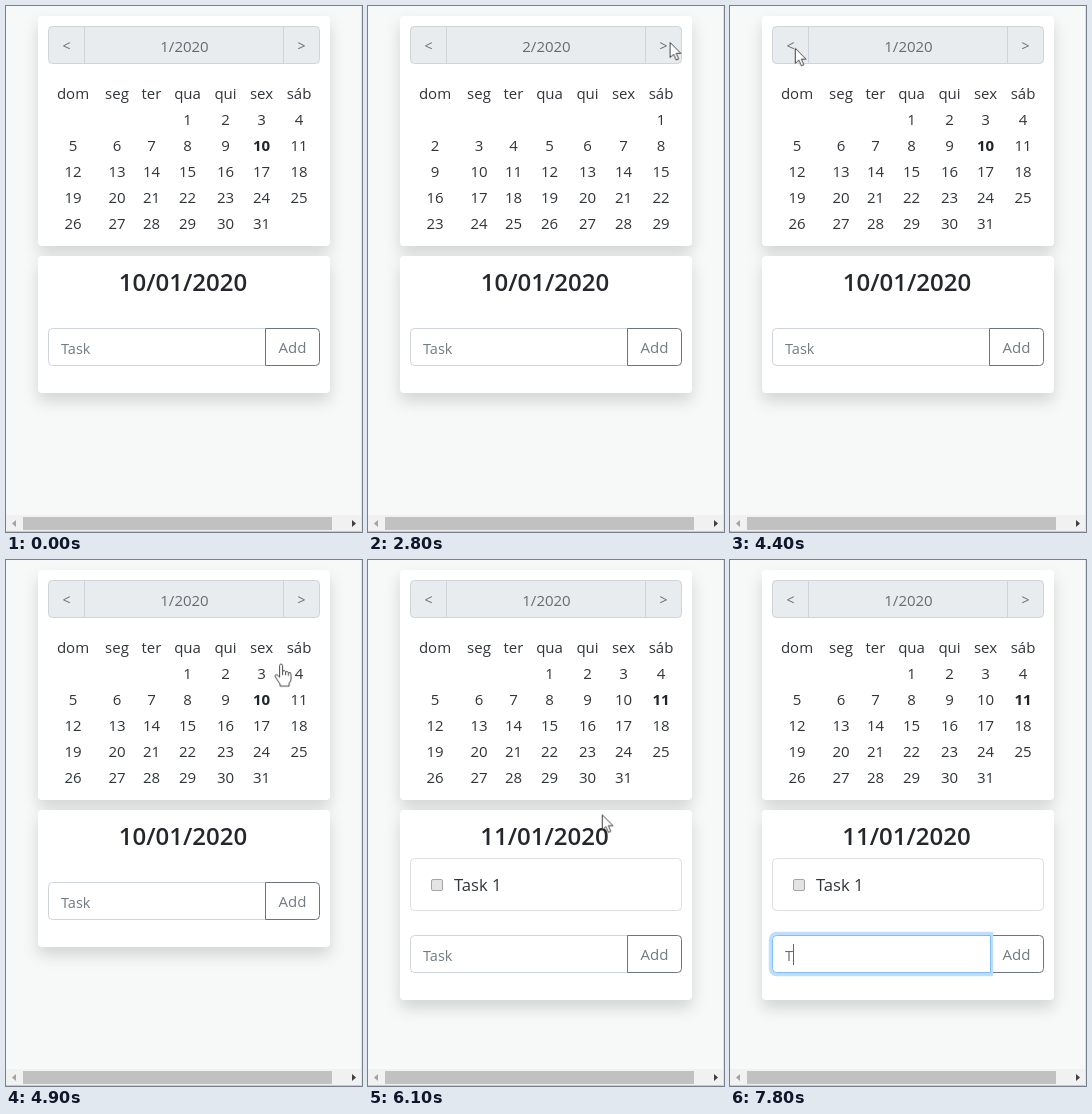
Animation of 356x526 px, one loop 8 s. Source, as an HTML page:

```html
<!DOCTYPE html>
<html lang="pt">
<head>
<meta charset="utf-8">
<title>Calendar tasks</title>
<style>
html, body { margin: 0; width: 100%; height: 100%; overflow: hidden; background: #f7f9f9; }
.stage { position: relative; width: 356px; height: 526px; overflow: hidden; }
.card {
  position: absolute; left: 32px; width: 292px; border-radius: 4px;
  background: #fff; box-shadow: 0 8px 16px rgba(0, 0, 0, .15);
}
.calendar { top: 10px; height: 230px; }
.tasks { top: 250px; height: 137px; }
svg { position: absolute; left: 0; top: 0; }
text { font: 15px "Open Sans", "Noto Sans", sans-serif; fill: #30353a; }
.mid { text-anchor: middle; }
.bold { font-weight: 700; fill: #212529; }
.muted { fill: #737b83; }
.label { fill: #656c73; }
.small { font-size: 14.5px; }
.step { font-size: 14px; }
.heading { font-size: 24px; font-weight: 600; fill: #24282c; }
.item { font-size: 16.6px; }
.box { fill: #fff; stroke: #ced4da; }

/* hard state changes */
.card.tasks, .january, .february, .day10, .day11, .task, .form, .placeholder,
.typed, .caret, .hand, .arrow { animation: 8s step-end infinite; }
.january { animation-name: january; }
.february { animation-name: february; }
.day10 { animation-name: day10; }
.day11 { animation-name: day11; }
.card.tasks { animation-name: grow; }
.task { animation-name: task; }
.form { animation-name: push; }
.placeholder { animation-name: placeholder; }
.typed { animation-name: typed; }
.caret { animation-name: caret; }
.hand { animation-name: hand; }
.arrow { animation-name: arrow; }
@keyframes january { 0%, 50% { opacity: 1 } 31.25% { opacity: 0 } }
@keyframes february { 0%, 50% { opacity: 0 } 31.25% { opacity: 1 } }
@keyframes day10 { 0% { opacity: 1 } 68.75% { opacity: 0 } }
@keyframes day11 { 0% { opacity: 0 } 68.75% { opacity: 1 } }
@keyframes grow { 0% { height: 137px } 70% { height: 190px } }
@keyframes push { 0% { transform: none } 70% { transform: translateY(53px) } }
@keyframes task { 0% { opacity: 0 } 70% { opacity: 1 } }
@keyframes placeholder { 0% { opacity: 1 } 97.5% { opacity: 0 } }
@keyframes typed { 0% { opacity: 0 } 97.5% { opacity: 1 } }
@keyframes caret { 0%, 90% { opacity: 0 } 86.25% { opacity: 1 } }
@keyframes hand { 0%, 74.4% { opacity: 0 } 58% { opacity: 1 } }
@keyframes arrow { 0%, 74.4% { opacity: 1 } 58%, 84.5% { opacity: 0 } }

.focus { animation: focus 8s linear infinite; }
@keyframes focus { 0%, 85% { opacity: 0 } 87.5%, 100% { opacity: 1 } }

.pointer { animation: pointer 8s ease-in-out infinite; }
@keyframes pointer {
  0%, 8.75% { transform: translate(364px, 95px); animation-timing-function: ease-out }
  16.25%, 33.75% { transform: translate(308px, 36px) }
  45%, 53.75% { transform: translate(52px, 38px) }
  61.25% { transform: translate(275px, 104px); animation-timing-function: ease-out }
  66.25%, 68.75% { transform: translate(297px, 135px); animation-timing-function: ease-in }
  76.25% { transform: translate(234px, 254px); animation-timing-function: linear }
  78.75% { transform: translate(186px, 334px); animation-timing-function: ease-out }
  81.25%, 100% { transform: translate(167px, 357px) }
}
</style>
</head>
<body>
<div class="stage">
  <div class="card calendar"></div>
  <div class="card tasks"></div>
  <svg width="356" height="526" viewBox="0 0 356 526">
    <rect x="42.5" y="20.5" width="271" height="37" rx="4" fill="#e9ecef" stroke="#ced4da"/>
    <path d="M78.5 21V57M277.5 21V57" stroke="#ced4da"/>
    <text class="mid label step" x="60.5" y="45">&lt;</text>
    <text class="mid label step" x="295.5" y="45">&gt;</text>
    <g id="weekdays"></g>
    <g id="january" class="january"><text class="mid label" x="178.5" y="46">1/2020</text></g>
    <g id="february" class="february"><text class="mid label" x="178.5" y="46">2/2020</text></g>

    <text class="mid heading day10" x="177" y="285">10/01/2020</text>
    <text class="mid heading day11" x="176.5" y="285">11/01/2020</text>

    <g class="task">
      <rect x="42.5" y="298.5" width="271" height="52" rx="4" fill="#fff" stroke="#dfdfdf"/>
      <rect x="63.5" y="319.5" width="11" height="11" rx="1.5" fill="#e4e4e4" stroke="#a5a5a5"/>
      <text class="item" x="86" y="331">Task 1</text>
    </g>

    <g class="form">
      <path class="box" d="M259.5 322.5H46.5a4 4 0 0 0-4 4V355.5a4 4 0 0 0 4 4H259.5z"/>
      <path d="M259.5 322.5H309.5a4 4 0 0 1 4 4V355.5a4 4 0 0 1-4 4H259.5z" fill="#fff" stroke="#6c757d"/>
      <text class="mid muted" x="286.5" y="347">Add</text>
      <g class="focus">
        <path d="M261.6 320.4H46.4a6 6 0 0 0-6 6V355.6a6 6 0 0 0 6 6H261.6z" fill="none" stroke="#bfdeff" stroke-width="3.2"/>
        <path d="M260.5 322.5H46.5a4 4 0 0 0-4 4V355.5a4 4 0 0 0 4 4H260.5z" fill="#fff" stroke="#80bdff"/>
      </g>
      <text class="small muted placeholder" x="55" y="347.5">Task</text>
      <path class="caret" d="M55.5 331V353" stroke="#666"/>
      <g class="typed">
        <text class="small label" x="55" y="347.5">T</text>
        <path d="M63.5 331V352" stroke="#666"/>
      </g>
    </g>

    <rect y="509" width="356" height="17" fill="#f1f1f1"/>
    <rect x="17" y="511" width="309" height="13" fill="#c1c1c1"/>
    <path d="M10 514V521L6 517.5z" fill="#a3a3a3"/>
    <path d="M346 514V521L350 517.5z" fill="#404040"/>
    <path d="M0 525.5H356" stroke="#c8c8c8"/>
    <path d="M355.5 0V526" stroke="#e2e4e4"/>

    <g class="pointer" fill="#fff" stroke="#333" stroke-width=".9" stroke-linejoin="round">
      <path class="arrow" d="M.5 .5V15.5L4 12.2L6.5 18L9 17L6.5 11.3H11.2z"/>
      <g class="hand">
        <path d="M-1.5 11V1.5Q-1.5 0 0 0T1.5 1.5V7Q3.5 5.5 4.5 7.5Q6.5 6.5 7.3 8.5Q10 7.5 10 10.5V15Q10 17 8 19V22H-1V20L-5 14Q-7 11.5-5.5 10.7T-1.5 13z"/>
        <path d="M1.5 7V11M4.5 7.5V11M7.3 8.5V11.5" fill="none"/>
      </g>
    </g>
  </svg>
</div>
<script>
const columns = [67, 111, 145.5, 181.5, 219.5, 255.5, 293];

function addText(parent, content, column, y, style = "") {
  const node = document.createElementNS("http://www.w3.org/2000/svg", "text");
  node.setAttribute("x", columns[column]);
  node.setAttribute("y", y);
  node.setAttribute("class", "mid " + style);
  node.textContent = content;
  document.getElementById(parent).append(node);
}

function addMonth(id, firstColumn, length, selectable) {
  for (let day = 1; day <= length; day++) {
    const cell = firstColumn + day - 1;
    const place = [id, day, cell % 7, 119 + 26 * Math.floor(cell / 7)];
    if (selectable && (day === 10 || day === 11)) {
      addText(...place, "bold day" + day);
      addText(...place, "day" + (21 - day));
    } else {
      addText(...place);
    }
  }
}

["dom", "seg", "ter", "qua", "qui", "sex", "sáb"].forEach((name, i) => addText("weekdays", name, i, 93));
addMonth("january", 3, 31, true);
addMonth("february", 6, 29, false);
</script>
</body>
</html>
```
